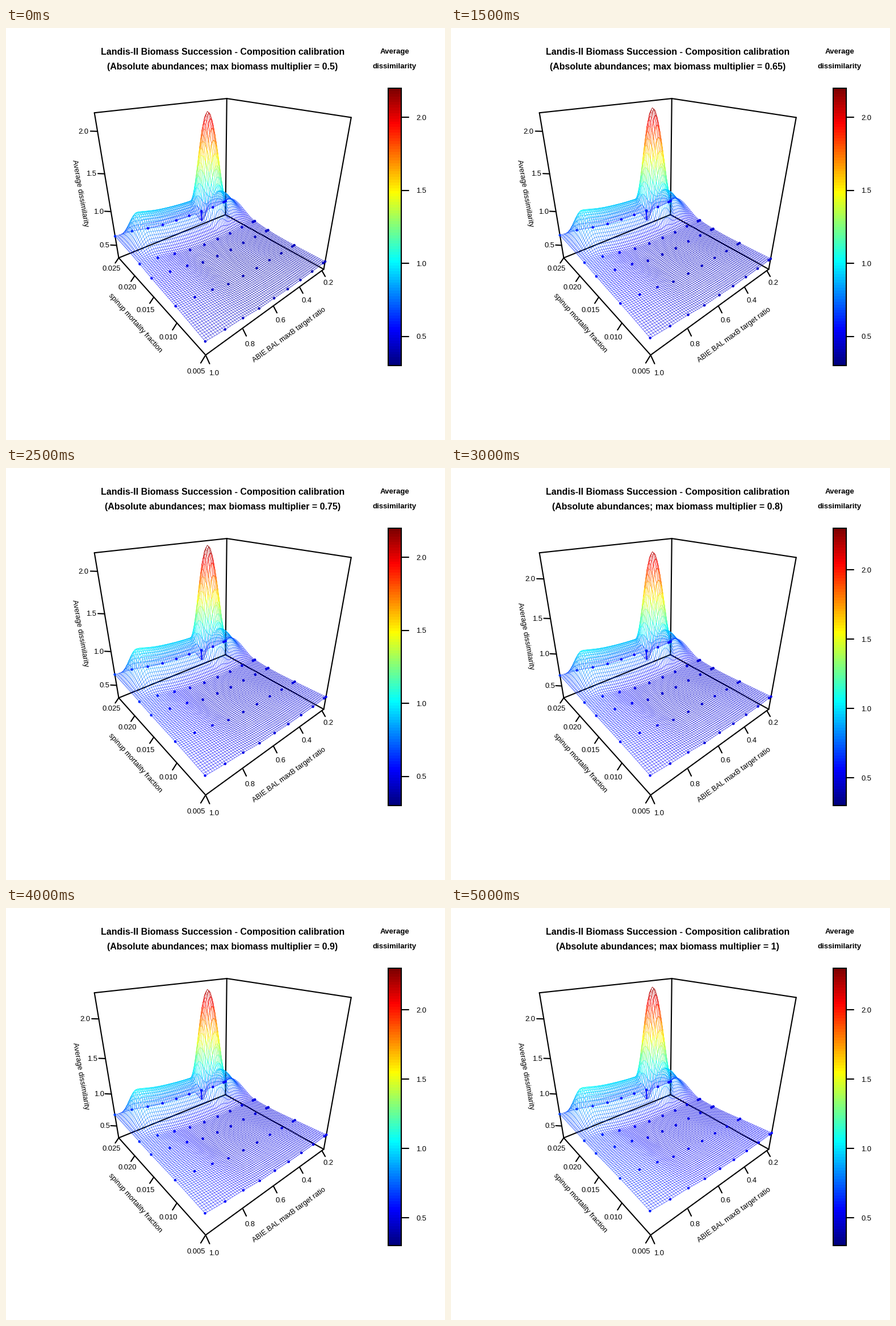
Animation, 773 px wide and 725 px high, one loop 5500 ms. Source, as a matplotlib script:

```python
import numpy as np
import matplotlib.pyplot as plt
from matplotlib.animation import FuncAnimation
from matplotlib.collections import LineCollection
from matplotlib.colors import LinearSegmentedColormap
from matplotlib.patches import Rectangle

WIDTH, HEIGHT, DPI = 773, 725, 100
FRAMES, INTERVAL = 11, 500
PX = 72 / DPI
Z_MIN = 0.3
X_SPAN = 0.818
STEPS = 70
TICK = 0.03

JET = LinearSegmentedColormap.from_list("jet9", [
    "#00007F", "#0000FF", "#007FFF", "#00FFFF", "#7FFF7F",
    "#FFFF00", "#FF7F00", "#FF0000", "#7F0000"], N=100)

# Sampled dissimilarity: one row per mortality value, columns by ratio 1.0 ... 0.2
V_NODES = np.array([0, 0.25, 0.5, 0.643, 1])
U_NODES = np.arange(9) * 0.1 / X_SPAN
Z_NODES = np.array([
    [0.475, 0.452, 0.437, 0.412, 0.408, 0.400, 0.402, 0.405, 0.417],
    [0.526, 0.501, 0.466, 0.414, 0.405, 0.404, 0.412, 0.410, 0.416],
    [0.566, 0.537, 0.502, 0.439, 0.425, 0.418, 0.430, 0.431, 0.435],
    [0.596, 0.574, 0.524, 0.479, 0.458, 0.452, 0.452, 0.466, 0.470],
    [0.640, 0.625, 0.581, 0.549, 0.539, 0.536, 0.536, 0.530, 0.550]])
V_GAIN = np.array([0.143, 0.117, 0.083, 0.064, 0.052])
OUTLIER = (U_NODES[6], 1.0)


def project(u, v, w):
    """Unit box to stage pixels."""
    u, v, w = np.broadcast_arrays(u, v, w)
    depth = 1 + 0.4033 * u + 0.4775 * v - 0.29 * w
    x = 351 + 433.4 * u - 58.45 * v - 108.3 * w
    y = 575 + 20 * u + 21.9 * v - 420.3 * w
    return np.stack([x / depth, y / depth], axis=-1)


def spline_weights(nodes, x):
    """Natural cubic spline as a matrix acting on the node values."""
    n = len(nodes)
    poly = np.stack([np.ones(n), nodes], axis=1)
    system = np.block([[abs(nodes[:, None] - nodes) ** 3, poly],
                       [poly.T, np.zeros((2, 2))]])
    basis = np.column_stack([abs(x[:, None] - nodes) ** 3, np.ones(len(x)), x])
    return basis @ np.linalg.inv(system)[:, :n]


def smoothstep(a, b, x):
    t = np.clip((x - a) / (b - a), 0, 1)
    return t * t * (3 - 2 * t)


def bump(u, v, u0, v0, ru, rv):
    """Cosine bell that is 1 at its centre and 0 outside the radii."""
    r = np.minimum(np.hypot((u - u0) / ru, (v - v0) / rv), 1)
    return (1 + np.cos(np.pi * r)) / 2


def plane(u, v, s):
    """Smooth sheet through the samples; s runs from 0 to 1 over the loop."""
    z = spline_weights(V_NODES, v) @ Z_NODES @ spline_weights(U_NODES, u).T
    gain = (spline_weights(V_NODES, v) @ V_GAIN)[:, None]
    gain = gain - 0.045 * v[:, None] ** 2 * np.clip((u - 0.6) / 0.4, 0, 1)
    return z + gain * s


def surface(u, v, s):
    z = plane(u, v, s)
    uu, vv = np.meshgrid(u, v)
    t = np.clip((vv - 0.643) / 0.357, 0, 1)
    ridge = 6.75 * t ** 2 * (1 - t)
    ridge *= smoothstep(0.005, 0.14, uu) * (1 - 0.65 * smoothstep(0.85, 1, uu))
    z += (0.38 + 0.05 * s) * ridge
    z += (1.25 + 0.06 * s) * bump(uu, vv, 0.703, 0.85, 0.143, 0.167)
    z -= 0.185 * bump(uu, vv, *OUTLIER, 0.08, 0.12)
    return z


def segments(grid):
    """Line pieces along both directions of a grid of points."""
    along = np.stack([grid[:, :-1], grid[:, 1:]], axis=2).reshape(-1, 2, 2)
    across = np.stack([grid[:-1], grid[1:]], axis=2).reshape(-1, 2, 2)
    return np.concatenate([along, across])


def segment_means(z):
    return np.concatenate([((z[:, :-1] + z[:, 1:]) / 2).ravel(),
                           ((z[:-1] + z[1:]) / 2).ravel()])


plt.rcParams["font.family"] = "Liberation Sans"
fig = plt.figure(figsize=(WIDTH / DPI, HEIGHT / DPI), dpi=DPI, facecolor="white")
ax = fig.add_axes([0, 0, 1, 1])
ax.axis("off")


def put_text(x, y, text, size=13, **kw):
    kw = {"ha": "center", "va": "baseline", **kw}
    return ax.text(x, y, text, fontsize=size * PX, **kw)


def put_number(pos, text):
    return put_text(pos[0], pos[1] + 4.5, text)


def put_lines(lines, zorder=1, width=2.1, color="black"):
    coll = LineCollection(lines, colors=color, linewidths=width * PX,
                          zorder=zorder, capstyle="round")
    ax.add_collection(coll, autolim=False)
    return coll


def tick(u, v, w, direction):
    """Tick line and label centre at a point on a box edge."""
    step = TICK * np.array(direction)
    base = np.array([u, v, w])
    start, end, label = (project(*(base + k * step)) for k in (0, 1, 2))
    return np.array([start, end]), label


# Box
corners = {"f": (0, 0), "r": (1, 0), "b": (1, 1), "l": (0, 1)}
low = {k: project(*c, 0) for k, c in corners.items()}
high = {k: project(*c, 1) for k, c in corners.items()}
put_lines([[low[a], low[b]] for a, b in ("fr", "rb", "bl", "lf")]
          + [[low[k], high[k]] for k in "lbr"]
          + [[high["l"], high["b"]], [high["b"], high["r"]]])

# Floor axes
floor_ticks = []
for value in (1.0, 0.8, 0.6, 0.4, 0.2):
    line, pos = tick((1 - value) / X_SPAN, 0, 0, (0, -1, -1))
    floor_ticks.append(line)
    put_number(pos, f"{value:.1f}")
for i in range(5):
    line, pos = tick(0, i / 4, 0, (-1, 0, -1))
    floor_ticks.append(line)
    put_number(pos, f"{0.005 * (i + 1):.3f}")
put_lines(floor_ticks)

put_text(227, 518.5, "spinup mortality fraction", 12.7, rotation=-48.2, va="center")
put_text(498, 539.5, "ABIE.BAL maxB target ratio", 12.7, rotation=36, va="center")
z_title = put_text(130, 290, "Average dissimilarity", 13, rotation=-80, va="center")

# Titles
put_text(381.5, 46, "Landis-II Biomass Succession - Composition calibration", 16, weight="bold")
subtitle = put_text(381, 72, "", 16, weight="bold")
put_text(684, 45, "Average", 13.2, weight="bold")
put_text(684, 71, "dissimilarity", 13.2, weight="bold")

# Colour key
BAR_TOP, BAR_BOTTOM = 105.5, 593.5
ax.imshow(np.linspace(1, 0, 100)[:, None], cmap=JET, aspect="auto",
          interpolation="nearest", extent=(672.5, 695.5, BAR_BOTTOM, BAR_TOP))
ax.add_patch(Rectangle((672.5, BAR_TOP), 23, BAR_BOTTOM - BAR_TOP,
                       fill=False, lw=2.1 * PX, ec="black", zorder=3))

# Whole coordinates fall on pixel centres
ax.set(xlim=(-0.5, WIDTH - 0.5), ylim=(HEIGHT - 0.5, -0.5))

# Moving parts
Z_TICKS = (0.5, 1.0, 1.5, 2.0)
z_lines = put_lines([])
z_labels = [put_number((0, 0), f"{z:.1f}") for z in Z_TICKS]
bar_lines = put_lines([])
bar_labels = [put_number((0, 0), f"{z:.1f}") for z in Z_TICKS]
mesh = put_lines([], zorder=2, width=0.52)
mesh.set_snap(False)
drop = put_lines([], zorder=3)
dots = ax.scatter([], [], s=(4.6 * PX) ** 2, linewidths=0, zorder=4)

GRID = np.linspace(0, 1, STEPS + 1)
GRID_U, GRID_V = np.meshgrid(GRID, GRID)
DOT_COLS = np.append(U_NODES, 1)
DOT_U, DOT_V = np.meshgrid(DOT_COLS, V_NODES)


def update(frame):
    s = frame / (FRAMES - 1)
    z_max = 2.2 if frame < 6 else 2.3

    def unit(z):
        return (z - Z_MIN) / (z_max - Z_MIN)

    subtitle.set_text("(Absolute abundances; max biomass multiplier = "
                      f"{0.5 + 0.05 * frame:.2g})")
    z_title.set_position((130, 290) if frame < 6 else (131, 295.5))

    w = unit(surface(GRID, GRID, s))
    mesh.set_segments(segments(project(GRID_U, GRID_V, w)))
    mesh.set_color(JET(segment_means(w)))

    dot_w = unit(plane(DOT_COLS, V_NODES, s))
    dots.set_offsets(project(DOT_U, DOT_V, dot_w).reshape(-1, 2))
    dots.set_facecolor(JET(dot_w.ravel()))

    u, v = OUTLIER
    foot = unit(surface(np.array([u]), np.array([v]), s))[0, 0]
    drop.set_segments([[project(u, v, foot), project(u, v, dot_w[4, 6])]])
    drop.set_color(JET(dot_w[4, 6]))

    sides, marks = [], []
    for z, side, mark in zip(Z_TICKS, z_labels, bar_labels):
        line, pos = tick(0, 1, unit(z), (-1, 1, 0))
        sides.append(line)
        side.set_position((pos[0], pos[1] + 4.5))
        y = BAR_BOTTOM + unit(z) * (BAR_TOP - BAR_BOTTOM)
        marks.append([(696, y), (708, y)])
        mark.set_position((730.5, y + 4.5))
    z_lines.set_segments(sides)
    bar_lines.set_segments(marks)
    return []


anim = FuncAnimation(fig, update, frames=FRAMES, interval=INTERVAL,
                     repeat=True, repeat_delay=0, blit=False)
plt.show()
```
